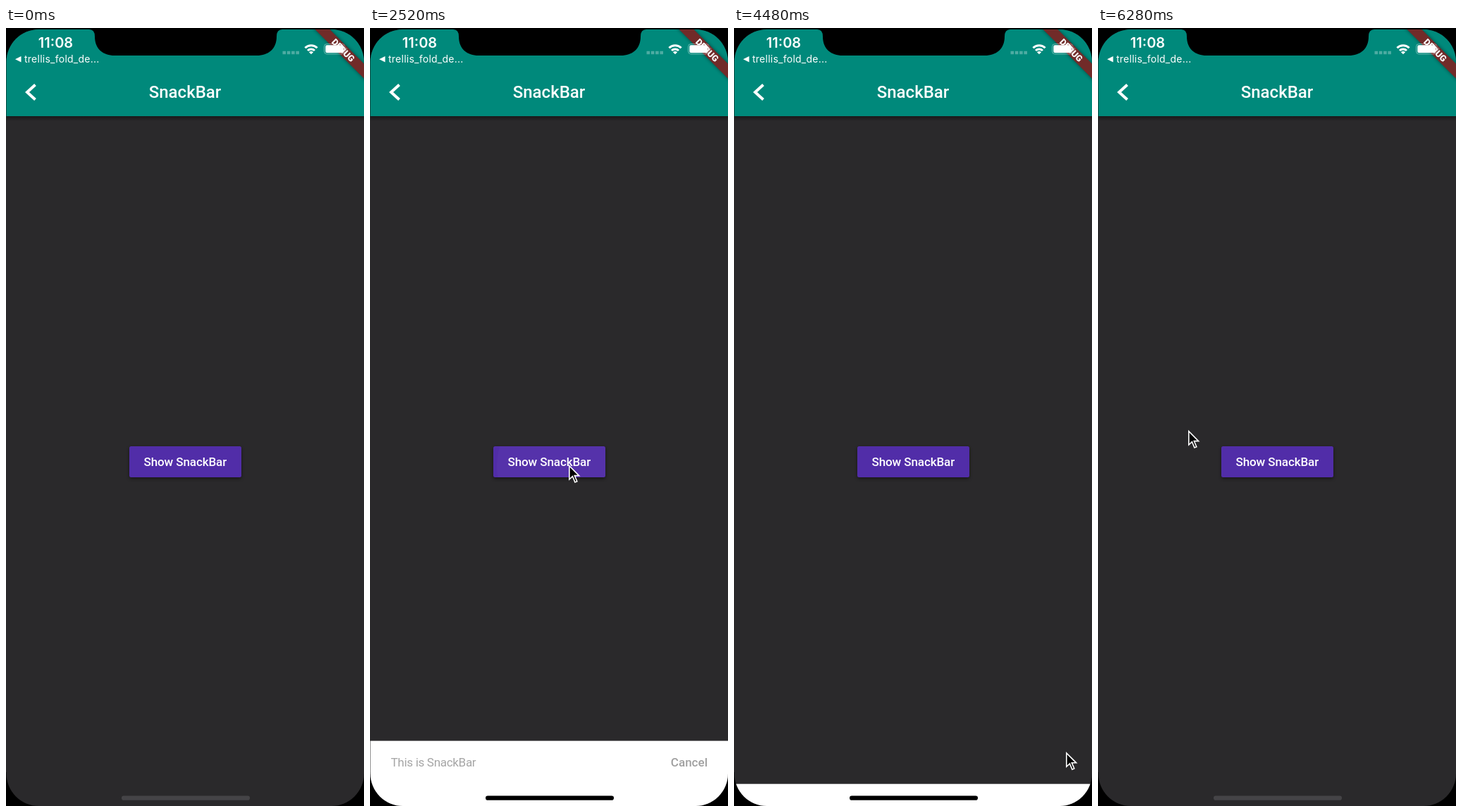
Write an HTML page that moves like this. It is 508 px wide and 1103 px high and loops after 6360 ms.

```html
<!DOCTYPE html>
<html lang="en">
<head>
<meta charset="utf-8">
<title>SnackBar demo</title>
<style>
  html, body { margin: 0; width: 100%; height: 100%; overflow: hidden; background: #000; }
  svg { display: block; width: 100%; height: 100%; }
  text { font-family: Roboto, sans-serif; font-weight: 500; fill: #fff; }
  .system { font-family: Inter, sans-serif; }
</style>
</head>
<body>
<svg viewBox="0 0 508 1103">
  <defs>
    <clipPath id="screen"><rect x="0.5" y="2" width="507.5" height="1101" rx="46"/></clipPath>
    <clipPath id="buttonClip"><rect x="175" y="593" width="159" height="44" rx="2.5"/></clipPath>
    <linearGradient id="barShadow" x2="0" y2="1">
      <stop stop-opacity=".4"/>
      <stop offset="1" stop-opacity="0"/>
    </linearGradient>
    <filter id="blur" x="-20%" y="-50%" width="140%" height="200%"><feGaussianBlur stdDeviation="2.5"/></filter>
  </defs>

  <rect width="508" height="1103"/>
  <g clip-path="url(#screen)">
    <rect width="508" height="1103" fill="#2a292b"/>
    <rect y="125" width="1" height="930" fill="#3d3c3e"/>
    <rect y="125" width="508" height="7" fill="url(#barShadow)"/>
    <rect width="508" height="125" fill="#00897b"/>

    <path d="M41.5 80.5 30 91 41.5 101.5" fill="none" stroke="#fff" stroke-width="4"/>
    <text x="254" y="99.3" font-size="24" text-anchor="middle">SnackBar</text>

    <rect id="buttonShadow" x="175" y="595" width="159" height="44" rx="3" filter="url(#blur)"/>
    <g clip-path="url(#buttonClip)">
      <rect x="175" y="593" width="159" height="44" fill="#512da8"/>
      <circle id="ripple" cx="280" cy="621" fill="#fff"/>
    </g>
    <text x="254.3" y="620.8" font-size="17" letter-spacing="-.1" text-anchor="middle">Show SnackBar</text>

    <g id="snack">
      <rect width="508" height="101" fill="#fff"/>
      <g id="snackText">
        <text x="29.5" y="36" font-size="17" letter-spacing="-.3" style="font-weight:400;fill:#222">This is SnackBar</text>
        <text x="479" y="36" font-size="17" text-anchor="end" style="fill:#151515">Cancel</text>
      </g>
    </g>

    <g transform="translate(508 2) rotate(45)">
      <rect x="-75" y="34.4" width="150" height="14.7" opacity=".5" filter="url(#blur)"/>
      <rect x="-75" y="34.4" width="150" height="14.7" fill="#712b29"/>
      <text y="46.2" font-size="12.5" text-anchor="middle" style="font-weight:900">DEBUG</text>
    </g>
  </g>

  <path d="M112 0V2H118Q126 2 126 12C126 30 138 39 154 39H356C372 39 384 30 384 12Q384 2 392 2H400V0Z"/>

  <text class="system" x="70.5" y="28.3" font-size="20" text-anchor="middle" style="font-weight:600">11:08</text>
  <path d="M13 44.3 21.5 40V48.6Z" fill="#fff"/>
  <text class="system" x="26" y="49" font-size="14" letter-spacing=".25" style="font-weight:400">trellis_fold_de...</text>

  <path d="M392.5 35H416" stroke="#fff" stroke-opacity=".3" stroke-width="4.4" stroke-dasharray="4.6 1.7"/>
  <g fill="none" stroke="#fff" stroke-width="3">
    <path d="M424.4 28.2A12.3 12.3 0 0 1 441.6 28.2"/>
    <path d="M428 32A7.2 7.2 0 0 1 438 32"/>
  </g>
  <path d="M433 37.3 429.9 34.2A4.4 4.4 0 0 1 436.1 34.2Z" fill="#fff"/>
  <rect x="451.5" y="22.5" width="29.5" height="14.5" rx="4" fill="none" stroke="#fff" stroke-opacity=".4"/>
  <rect x="453.3" y="24.3" width="26" height="11" rx="2.4" fill="#fff"/>
  <path d="M482.6 27.3Q485.4 29.7 482.6 32.2Z" fill="#fff" opacity=".45"/>

  <rect id="home" x="164" y="1088.5" width="182" height="6.3" rx="3.1"/>
  <path id="cursor" d="M.8 1.8V21L5.4 16.7 8.9 24.9 11.8 23.7 8.3 15.6H14.6Z" stroke="#fff" stroke-width="1.6"/>
</svg>

<script>
const LOOP = 6360, STEP = 40;
const SHOW = 2352, HIDE = 4300, SLIDE = 250, SNACK_HEIGHT = 100;
const PRESS = 2200, RELEASE = 2350;

// Pointer stops: time, x, y
const stops = [
  [920, 420, 1103], [1520, 372, 782], [1640, 333, 678], [1960, 282, 619],
  [3120, 282, 619], [3680, 472, 1027], [4440, 472, 1027], [4680, 445, 1004],
  [5380, 147, 588], [5640, 128, 570], [LOOP, 128, 570]
];

const $ = id => document.getElementById(id);
const set = (id, attrs) => {
  for (const name in attrs) $(id).setAttribute(name, attrs[name]);
};
const clamp = v => Math.min(1, Math.max(0, v));

// cubic-bezier(.4, 0, .2, 1)
function fastOutSlowIn(p) {
  let lo = 0, hi = 1;
  for (let i = 0; i < 20; i++) {
    const s = (lo + hi) / 2, r = 1 - s;
    if (1.2 * r * r * s + 0.6 * r * s * s + s ** 3 < p) lo = s; else hi = s;
  }
  return lo * lo * (3 - 2 * lo);
}

const slope = (a, b, axis) => (b[axis] - a[axis]) / (b[0] - a[0]);

// Harmonic mean of neighbouring slopes: no overshoot, still at rests
function tangent(i, axis) {
  if (!i) return slope(stops[0], stops[1], axis);
  if (i === stops.length - 1) return 0;
  const a = slope(stops[i - 1], stops[i], axis), b = slope(stops[i], stops[i + 1], axis);
  return a * b > 0 ? 2 * a * b / (a + b) : 0;
}

function pointer(t, axis) {
  const i = Math.max(0, stops.findIndex(s => s[0] > t) - 1);
  const a = stops[i], b = stops[i + 1], d = b[0] - a[0], u = (t - a[0]) / d, v = 1 - u;
  return a[axis] * (1 + 2 * u) * v * v + b[axis] * (3 - 2 * u) * u * u
    + d * u * v * (tangent(i, axis) * v - tangent(i + 1, axis) * u);
}

function draw(t) {
  const moving = t >= stops[0][0];
  set('cursor', {
    visibility: moving ? 'visible' : 'hidden',
    transform: moving ? `translate(${pointer(t, 1)} ${pointer(t, 2)})` : ''
  });

  const open = clamp((t - SHOW) / SLIDE) - clamp((t - HIDE) / SLIDE);
  set('snack', {
    transform: `translate(0 ${1103 - SNACK_HEIGHT * fastOutSlowIn(open)})`,
    visibility: open > 0 ? 'visible' : 'hidden'
  });
  set('snackText', { opacity: clamp((open - 0.45) / 0.55) });
  set('home', { fill: open > 0 ? '#000' : '#454447' });

  const fade = t < PRESS ? 0 : 1 - clamp((t - RELEASE) / 200);
  set('ripple', { r: Math.max(0, 12 + (t - PRESS) * 0.275), opacity: 0.15 * fade });
  set('buttonShadow', { opacity: 0.45 + 0.3 * fade });
}

function tick() {
  const t = performance.now() % LOOP;
  draw(Math.floor(t / STEP) * STEP);
  requestAnimationFrame(tick);
}
tick();
</script>
</body>
</html>
```
